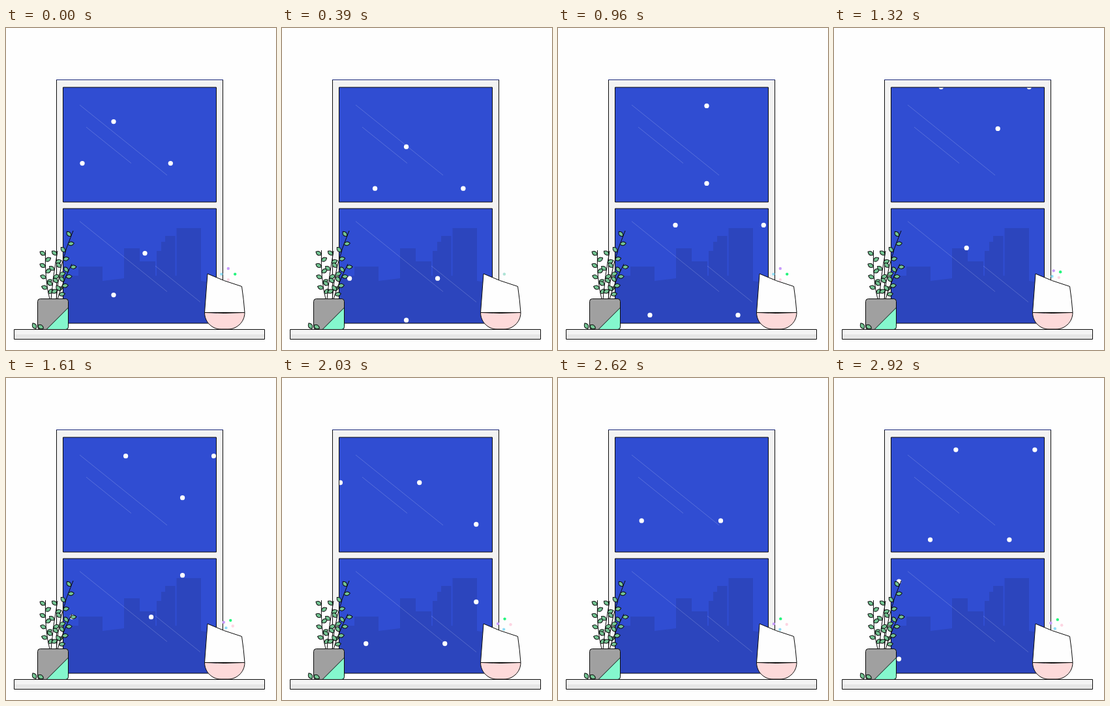
An HTML page with a canvas for the animation above (3.02 s loop, 414 by 494 pixels).

```html
<!DOCTYPE html>
<html lang="en">
<head>
<meta charset="utf-8">
<title>Snowy window</title>
<style>
html, body { margin: 0; width: 100%; height: 100%; overflow: hidden; background: #fefefe; }
canvas { display: block; }
</style>
</head>
<body>
<canvas id="stage" width="414" height="494"></canvas>
<script>
const ctx = document.getElementById('stage').getContext('2d');
const W = 414, H = 494, LOOP = 3020;
const INK = '#0b0b0b', PAPER = '#fefefe', NIGHT = '#304dd2', CITY = '#2c45bd', LEAF = '#74c493';

// The picture advances in short holds whose length shifts a little over the loop
function heldTime(t) {
  const [start, step] = t < 390 ? [0, 65] : t < 960 ? [390, 57] : [960, 59.08];
  const count = Math.min(33, Math.floor((t - start) / step));
  return start + count * step;
}

const mix = (a, b, k) => a + (b - a) * k;

function paint(fill, stroke) {
  if (fill) { ctx.fillStyle = fill; ctx.fill(); }
  if (stroke) { ctx.strokeStyle = stroke; ctx.stroke(); }
}

function shape(points, fill, stroke) {
  ctx.beginPath();
  points.forEach(([x, y]) => ctx.lineTo(x, y));
  if (fill) ctx.closePath();
  paint(fill, stroke);
}

function box(x, y, w, h, fill, stroke) {
  ctx.beginPath();
  ctx.rect(x, y, w, h);
  paint(fill, stroke);
}

function dot(x, y, r, fill) {
  ctx.beginPath();
  ctx.arc(x, y, r, 0, Math.PI * 2);
  paint(fill);
}

const pane = { x: 87.5, w: 235, h: 176, tops: [91, 277] };
const eachPane = (fill, stroke) => pane.tops.forEach(y => box(pane.x, y, pane.w, pane.h, fill, stroke));

function clipPanes() {
  ctx.beginPath();
  pane.tops.forEach(y => ctx.rect(pane.x + .5, y + .5, pane.w - 1, pane.h - 1));
  ctx.clip();
}

function windowFrame() {
  box(77.5, 79.5, 255, 383.5, '#f3f3f3', INK);
  shape([[77, 79.5], [333, 79.5]], null, '#1c2a7c');
  box(87, 453, 236, 9, PAPER);
  eachPane(NIGHT);
}

// Buildings: left, roof, width
const towers = [[111, 366, 37], [181, 338, 24], [205, 358, 24], [231, 342, 7],
  [238, 328, 6], [244, 319, 15.5], [261.5, 307, 37.5]];

function skyline() {
  ctx.beginPath();
  towers.forEach(([x, y, w]) => ctx.rect(x, y, w, 460 - y));
  ctx.rect(88, 380, 23, 80);
  paint(CITY);
  shape([[148, 388], [181, 384], [181, 380], [299, 380], [299, 388], [323, 392],
    [323, 460], [148, 460]], CITY);
}

// A long and a short streak, repeated on each pane
function reflections() {
  const streak = (x, y, w) => shape([[x, y], [x + w, y + w * .805]], null, 'rgba(255,255,255,.19)');
  streak(113, 118, 134);
  streak(123, 152, 69);
  streak(113, 296.6, 134);
  streak(229, 365, 69);
}

// Snow is one repeating tile sliding down and to the right
const tile = { w: 256.3, h: 385 };
const flakes = [[164, 24], [164, 143], [116, 207], [251.3, 207], [77, 345], [212, 345]];

function snow(t) {
  const dx = .8 + .0656 * t, dy = .6 + .0988 * t;
  for (const [x, y] of flakes)
    for (let i = -2; i < 2; i++)
      for (let j = -1; j < 2; j++)
        dot(x + dx + i * tile.w + .2, y + dy + j * tile.h, 3.65, '#fff');
}

// Four sparks: gather and part, then glide to the neighbouring corner and back
const sparkInk = ['#c79cfb', '#8fdcf7', '#fdd5e2', '#23f57c'];

function sparks(t) {
  const gather = t < 860 ? Math.sin(Math.PI * t / 860) ** 2 : 0;
  const glide = t > 960 ? Math.sin(Math.PI / 2 * (t - 960) / 1390) : 0;
  const corner = i => [340.8 - 10.4 * Math.sin(i * Math.PI / 2), 377.6 - 8.6 * Math.cos(i * Math.PI / 2)];
  ctx.globalAlpha = 1 - .75 * gather;
  sparkInk.forEach((ink, i) => {
    const from = corner(i), to = corner(i + 1);
    dot(mix(mix(from[0], to[0], glide), 340.8, gather),
        mix(mix(from[1], to[1], glide), 377.6, gather), 2.2, ink);
  });
  ctx.globalAlpha = 1;
}

function vase() {
  ctx.beginPath();
  ctx.moveTo(309, 377);
  ctx.quadraticCurveTo(334, 388.5, 361.5, 396.5);
  ctx.quadraticCurveTo(364.5, 416, 366, 436.5);
  ctx.lineTo(304.5, 436.5);
  ctx.closePath();
  paint(PAPER, INK);
  ctx.beginPath();
  ctx.moveTo(304.5, 436.5);
  ctx.quadraticCurveTo(335, 438.5, 366, 436.5);
  ctx.bezierCurveTo(366, 452, 353, 462, 341, 462);
  ctx.lineTo(329, 462);
  ctx.bezierCurveTo(317, 462, 304.5, 452, 304.5, 436.5);
  paint('#fddada', INK);
}

// A leaf grows from its base in the given direction
function leaf(x, y, angle, size = 10) {
  ctx.save();
  ctx.translate(x, y);
  ctx.rotate(angle);
  ctx.beginPath();
  ctx.moveTo(0, 0);
  ctx.quadraticCurveTo(size / 2, -size * .62, size, 0);
  ctx.quadraticCurveTo(size / 2, size * .62, 0, 0);
  paint(LEAF, INK);
  ctx.restore();
}

// Stem: root, bend, tip and the number of leaves alternating up its sides
const stems = [
  { pts: [[67, 416], [59, 385], [60.5, 341]], count: 8 },
  { pts: [[69, 416], [72, 380], [79, 342]], count: 6 },
  { pts: [[77, 416], [80, 365], [103, 311]], count: 8 },
  { pts: [[79, 416], [86, 392], [101, 362]], count: 7 }
];

function plant() {
  for (const { pts: [a, b, c], count } of stems) {
    ctx.beginPath();
    ctx.moveTo(...a);
    ctx.quadraticCurveTo(...b, ...c);
    paint(null, INK);
    const at = (k, axis) => mix(mix(a[axis], b[axis], k), mix(b[axis], c[axis], k), k);
    const slope = (k, axis) => mix(b[axis] - a[axis], c[axis] - b[axis], k);
    for (let i = 0; i < count; i++) {
      const k = mix(.14, .92, i / (count - 1));
      const side = i % 2 ? -1 : 1;
      leaf(at(k, 0), at(k, 1), Math.atan2(slope(k, 1), slope(k, 0)) + side * 1.08, 9.5);
    }
  }
}

function pot() {
  const body = () => {
    ctx.beginPath();
    ctx.roundRect(48.5, 415.5, 47, 47, 4);
  };
  ctx.save();
  body();
  paint('#a0a0a0');
  ctx.clip();
  shape([[96, 428.5], [96, 463], [61.5, 463]], '#84f7cd', INK);
  ctx.restore();
  body();
  paint(null, INK);
  leaf(46, 461.5, -2.1);
  leaf(57.5, 461, -2.62);
}

function sill() {
  box(12.5, 462.5, 384, 15, '#f4f4f4');
  box(13, 470, 383, 7, '#e6e6e6');
  box(12.5, 462.5, 384, 15, null, INK);
}

function draw(t) {
  box(0, 0, W, H, PAPER);
  windowFrame();
  ctx.save();
  clipPanes();
  skyline();
  reflections();
  snow(t);
  ctx.restore();
  eachPane(null, INK);
  sparks(t);
  vase();
  plant();
  pot();
  sill();
}

ctx.lineJoin = 'round';
const begin = performance.now();
function tick() {
  draw(heldTime((performance.now() - begin) % LOOP));
  requestAnimationFrame(tick);
}
tick();
</script>
</body>
</html>
```
